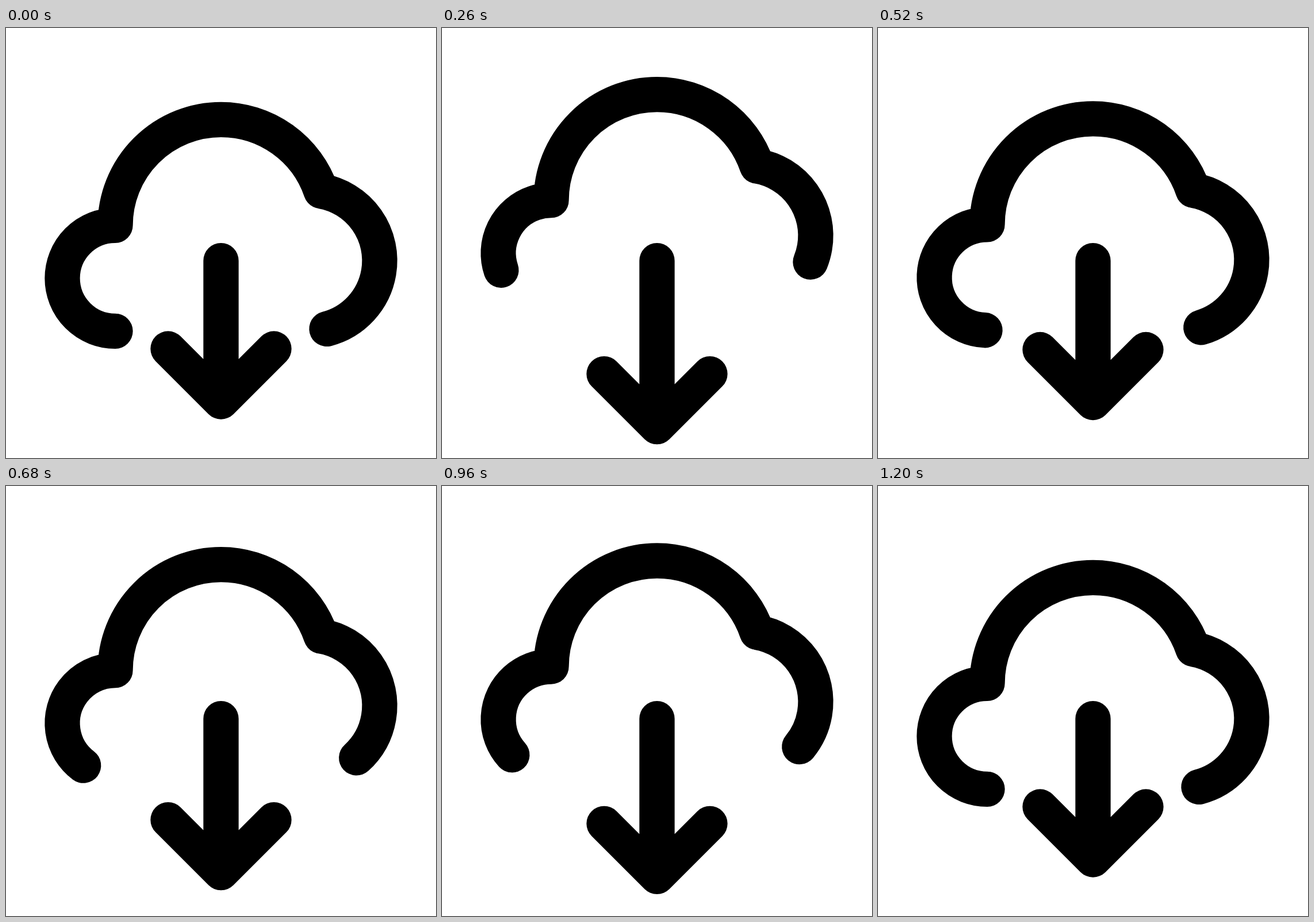
Recreate the animation shown at these times as an HTML page with a canvas. Size 748 by 748 pixels, loop 2840 ms.

```html
<!DOCTYPE html>
<html lang="en">
<head>
<meta charset="utf-8">
<title>Cloud download</title>
<style>
  html, body { margin: 0; width: 100%; height: 100%; overflow: hidden; background: #fff; }
  canvas { display: block; width: 100vw; height: 100vh; }
</style>
</head>
<body>
<canvas id="stage" width="748" height="748"></canvas>
<script>
const ctx = document.getElementById('stage').getContext('2d');
const LOOP = 2840, HALF = 300, BOUNCES = 2;
const UNIT = 736 / 24, MARGIN = 6;
const LIFT = 44 / UNIT;   // travel of cloud and arrow head, in icon units
const TRIM = 2.62;        // stroke cut from each cloud end per unit of travel

// Cubic bezier easing (x1, 0, x2, 1), solved by bisection
function ease(x, x1 = 0.27, x2 = 0.1) {
  let lo = 0, hi = 1, s = 0.5;
  for (let i = 0; i < 30; i++) {
    s = (lo + hi) / 2;
    const bx = 3 * x1 * s * (1 - s) ** 2 + 3 * x2 * (1 - s) * s * s + s ** 3;
    if (bx < x) lo = s; else hi = s;
  }
  return s * s * (3 - 2 * s);
}

function travel(t) {
  if (t >= BOUNCES * 2 * HALF) return 0;
  const leg = Math.floor(t / HALF);
  const p = ease(t / HALF - leg);
  return LIFT * (leg % 2 ? 1 - p : p);
}

function drawCloud(d) {
  const cut = TRIM * d;
  // The crown and right lobe meet at (17.677, 9.058)
  const crownEnd = Math.atan2(9.058 - 11, 17.677 - 12);
  const lobeStart = Math.atan2(9.058 - 13, 17.677 - 17);
  const lobeEnd = Math.atan2(Math.sqrt(15), 1);
  ctx.beginPath();
  ctx.arc(6, 14 - d, 3, Math.PI / 2 + cut / 3, Math.PI * 1.5);
  ctx.arc(12, 11 - d, 6, Math.PI, crownEnd);
  ctx.arc(17, 13 - d, 4, lobeStart, lobeEnd - cut / 4);
  ctx.stroke();
}

function drawArrow(d) {
  ctx.beginPath();
  ctx.moveTo(12, 13);
  ctx.lineTo(12, 21 + d);
  ctx.moveTo(9, 18 + d);
  ctx.lineTo(12, 21 + d);
  ctx.lineTo(15, 18 + d);
  ctx.stroke();
}

function draw(t) {
  const d = travel(t);
  ctx.setTransform(1, 0, 0, 1, 0, 0);
  ctx.fillStyle = '#fff';
  ctx.fillRect(0, 0, 748, 748);
  ctx.setTransform(UNIT, 0, 0, UNIT, MARGIN, MARGIN);
  ctx.strokeStyle = '#000';
  ctx.lineWidth = 2;
  ctx.lineCap = ctx.lineJoin = 'round';
  drawCloud(d);
  drawArrow(d);
}

const start = performance.now();
function tick() {
  draw((performance.now() - start) % LOOP);
  requestAnimationFrame(tick);
}
tick();
</script>
</body>
</html>
```
